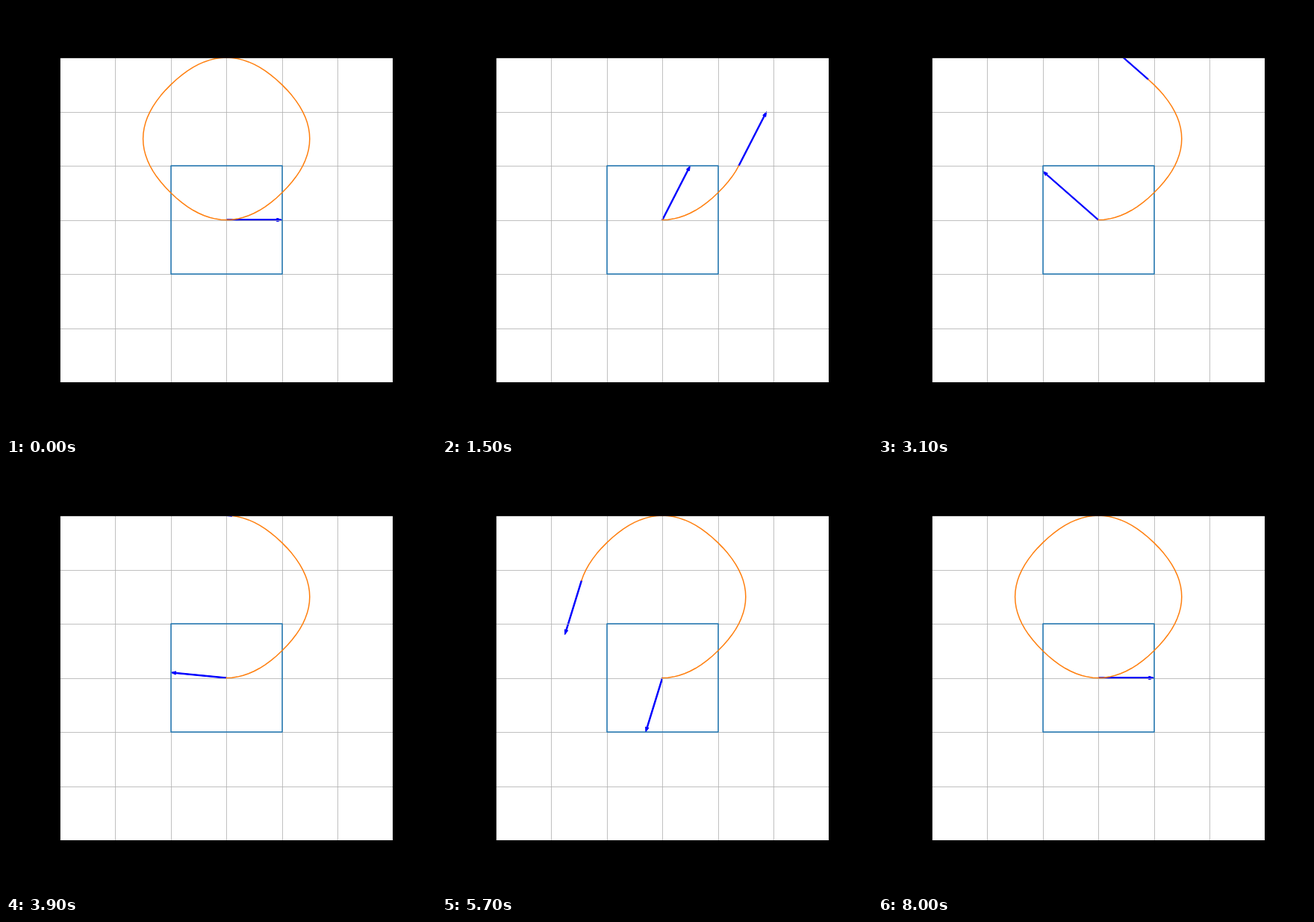
An HTML page with a canvas for the animation above (8100 ms loop, 576 by 576 pixels).

```html
<!DOCTYPE html>
<html lang="en">
<head>
<meta charset="utf-8">
<title>Walking along a square</title>
<style>
  html, body { margin: 0; width: 100%; height: 100%; overflow: hidden; background: #000; }
  canvas { display: block; }
</style>
</head>
<body>
<canvas id="stage" width="576" height="576"></canvas>
<script>
const ctx = document.getElementById('stage').getContext('2d');
const STEP = 100, STEPS = 81;
const BOX = { left: 72, top: 69, right: 518, bottom: 504 };

const px = x => 295.2 + 74.4 * x;
const py = y => 286.56 - 72.48 * y;
const snap = v => Math.floor(v + 0.5);

// Point on the square's edge after walking a distance s from (1, 0).
function edge(s) {
  if (s <= 1) return [1, s];
  if (s <= 3) return [2 - s, 1];
  if (s <= 5) return [-1, 4 - s];
  if (s <= 7) return [s - 6, -1];
  return [1, s - 8];
}

// Running integral of edge(); trapezoids are exact on straight sides.
const path = [[0, 0]];
for (let i = 1; i < STEPS; i++) {
  const a = edge((i - 1) / 10), b = edge(i / 10), p = path[i - 1];
  path.push([p[0] + (a[0] + b[0]) / 20, p[1] + (a[1] + b[1]) / 20]);
}

function line(x1, y1, x2, y2) {
  ctx.beginPath();
  ctx.moveTo(x1, y1);
  ctx.lineTo(x2, y2);
  ctx.stroke();
}

function style(color, width) {
  ctx.strokeStyle = color;
  ctx.lineWidth = width;
}

function arrow([x, y], [dx, dy]) {
  const len = Math.hypot(dx, dy), ux = dx / len, uy = dy / len;
  const shaft = 0.01, head = 0.03, neck = len - 0.09;
  const outline = [
    [0, -shaft], [neck, -shaft], [neck, -head], [len, 0],
    [neck, head], [neck, shaft], [0, shaft]
  ];
  ctx.beginPath();
  for (const [a, b] of outline) {
    ctx.lineTo(px(x + a * ux - b * uy), py(y + a * uy + b * ux));
  }
  ctx.closePath();
  ctx.fillStyle = '#00f';
  style('#00f', 1);
  ctx.lineJoin = 'miter';
  ctx.fill();
  ctx.stroke();
}

function grid() {
  style('#b0b0b0', 0.8);
  for (let i = -3; i <= 3; i++) {
    const x = snap(px(i)) + 0.5, y = snap(py(i)) + 0.5;
    line(x, BOX.top, x, BOX.bottom);
    line(BOX.left, y, BOX.right, y);
  }
}

function square() {
  const x = snap(px(-1)), y = snap(py(1));
  style('#1f77b4', 1.5);
  ctx.lineJoin = 'round';
  ctx.strokeRect(x, y, snap(px(1)) - x, snap(py(-1)) - y);
}

function curve(count) {
  style('#ff7f0e', 1.5);
  ctx.lineJoin = 'round';
  ctx.lineCap = 'square';
  ctx.beginPath();
  for (let i = 0; i <= count; i++) ctx.lineTo(px(path[i][0]), py(path[i][1]));
  ctx.stroke();
  ctx.lineCap = 'butt';
}

function draw(n) {
  ctx.fillStyle = '#000';
  ctx.fillRect(0, 0, 576, 576);

  const w = BOX.right - BOX.left, h = BOX.bottom - BOX.top;
  ctx.save();
  ctx.beginPath();
  ctx.rect(BOX.left, BOX.top, w, h);
  ctx.clip();
  ctx.fillStyle = '#fff';
  ctx.fillRect(BOX.left, BOX.top, w, h);

  const dir = edge(n / 10);
  arrow([0, 0], dir);
  arrow(path[n], dir);
  grid();
  square();
  curve(n || STEPS - 1);   // the loop opens on the finished curve
  ctx.restore();

  style('#000', 0.8);
  ctx.lineJoin = 'miter';
  ctx.strokeRect(BOX.left + 0.5, BOX.top + 0.5, w, h);
}

let start;
function tick(now) {
  if (start === undefined) start = now;
  draw(Math.floor((now - start) / STEP) % STEPS);
  requestAnimationFrame(tick);
}
draw(0);
requestAnimationFrame(tick);
</script>
</body>
</html>
```
